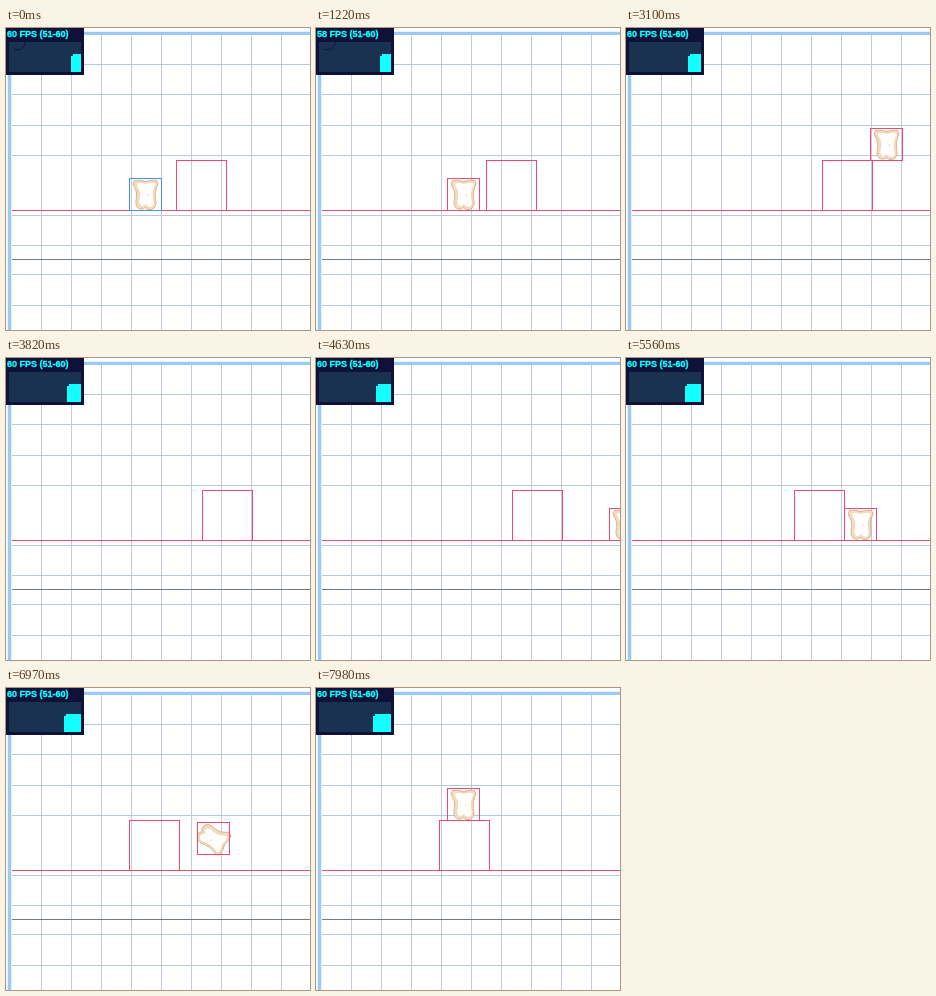
Recreate the animation shown at these times as an HTML page with a canvas. Size 304 by 302 pixels, loop 8000 ms.

```html
<!DOCTYPE html>
<html lang="en">
<head>
<meta charset="utf-8">
<title>Jumping toast</title>
<style>
  html, body { margin: 0; width: 100%; height: 100%; overflow: hidden; background: #fff; }
  canvas { display: block; width: 304px; height: 302px; }
</style>
</head>
<body>
<canvas id="stage" width="304" height="302"></canvas>
<script>
const ctx = document.getElementById('stage').getContext('2d');
const LOOP = 8;
const RED = '#f04871';

// Pixels and seconds
const FLOOR = 150, STEP = 50;
const WALK = 120, RETURN = 94, PUSH_RIGHT = 60, PUSH_LEFT = 65;
const JUMP = 371, GRAVITY = 1061;
const AIR_TIME = (JUMP + Math.sqrt(JUMP ** 2 - 2 * GRAVITY * STEP)) / GRAVITY;
const FIRST_JUMP = 2.22, FALL = 3.117, LAST_JUMP = 6.924;

const clamp = (v, max) => Math.min(max, Math.max(0, v));

// Distance covered so far by a steady move that begins at start
const travel = (t, start, distance, speed) =>
  Math.sign(distance) * clamp((t - start) * speed, Math.abs(distance));

// Height gained by a jump that lands on the box
const rise = age => {
  const a = clamp(age, AIR_TIME);
  return JUMP * a - GRAVITY / 2 * a * a;
};

const drop = age => Math.min(STEP, GRAVITY / 2 * Math.max(0, age) ** 2);

const pushed = t => travel(t, 1.28, 26, PUSH_RIGHT) + travel(t, 5.132, -73, PUSH_LEFT);

const boxX = t => 170 + pushed(t);

const toastX = t => 123 + pushed(t)
  + travel(t, 1.153, 15, WALK)
  + travel(t, 1.75, -24, WALK)
  + travel(t, 2.233, 180, WALK)
  + travel(t, 4.345, -74, RETURN)
  + travel(t, 6.4, 23, WALK)
  + travel(t, 6.928, -65, WALK);

const toastY = t => FLOOR - rise(t - FIRST_JUMP) + drop(t - FALL) - rise(t - LAST_JUMP);

const toastAngle = t => 2 * Math.PI *
  (clamp((t - FIRST_JUMP) / AIR_TIME, 1) + clamp((t - 6.74) / 0.69, 1));

function fill(color, x, y, w, h) {
  ctx.fillStyle = color;
  ctx.fillRect(x, y, w, h);
}

function outline(color, x, y, size) {
  ctx.strokeStyle = color;
  ctx.lineWidth = 1;
  ctx.strokeRect(Math.round(x) + 0.5, Math.round(y) + 0.5, size, size);
}

function drawGrid() {
  fill('#fff', 0, 0, 304, 302);
  for (let i = 1; i < 10; i++) fill('#c0cddd', Math.round(5.5 + i * 29.9), 6, 1, 296);
  for (const y of [36, 66, 97, 127, 187, 217, 246, 277]) fill('#b9c9dc', 6, y, 298, 1);
  fill('#767b82', 6, 231, 298, 1);
  fill('#e6f2fe', 1, 3, 303, 4);
  fill('#e6f2fe', 1, 3, 5, 299);
  fill('#9bcaf7', 2, 4, 302, 3);
  fill('#9bcaf7', 2, 4, 3, 298);
  fill(RED, 6, 182, 298, 1);
}

const slice = new Path2D('M-11-14Q-6-15 0-13Q6-15 11-14Q14-11 11-7Q9-2 10 4Q12 13 6 15Q2 16 0 13Q-3 16-7 14Q-11 11-9 3Q-8-3-11-7Q-14-11-11-14Z');
const crumb = new Path2D('M-8-12Q-4-13 0-11Q6-13 9-12Q12-10 9-7Q7-2 8 4Q10 12 5 13Q2 13 0 10Q-3 14-5 11Q-8 9-6 3Q-5-3-8-7Q-10-10-8-12Z');

function drawShape(path, color, edge, width) {
  ctx.fillStyle = color;
  ctx.strokeStyle = edge;
  ctx.lineWidth = width;
  ctx.fill(path);
  ctx.stroke(path);
}

function drawToast(x, y, angle) {
  ctx.save();
  ctx.translate(x + 16.5, y + 16.5);
  ctx.rotate(angle);
  drawShape(slice, '#f3dcc0', '#d0aa7e', 0.8);
  drawShape(crumb, '#fffefc', '#e9cca9', 0.6);
  fill('#c9b29a', 2, 0, 1, 1);
  ctx.restore();
}

function drawMeter(t) {
  const ticks = Math.floor(t + 0.5);
  fill('#101138', 0, 0, 78, 47);
  fill('#18324f', 3, 14, 72, 30);
  if (t < 2.6) {
    ctx.strokeStyle = '#0d1a34';
    ctx.lineWidth = 1;
    ctx.beginPath();
    ctx.moveTo(8, 21);
    ctx.bezierCurveTo(13, 23, 19, 21, 19, 14);
    ctx.stroke();
  }
  const left = 65 - ticks;
  for (let x = left; x < 75; x++) {
    const top = x < left + 2 ? 28 : 26;
    fill('#1ff', x, top, 1, 44 - top);
  }
  const label = `${ticks === 1 ? 58 : 60} FPS (51-60)`;
  ctx.font = 'bold 9px "Liberation Sans", Arial, sans-serif';
  ctx.fillStyle = ctx.strokeStyle = '#1ff';
  ctx.lineWidth = 0.35;
  ctx.fillText(label, 1, 9);
  ctx.strokeText(label, 1, 9);
}

function draw(t) {
  const x = toastX(t), y = toastY(t);
  drawGrid();
  outline(RED, boxX(t), 132, 50);
  drawToast(x, y, toastAngle(t));
  outline(t < 0.1 ? '#4c8fe8' : RED, x, y, 32);
  drawMeter(t);
}

const start = performance.now();
function frame() {
  draw((performance.now() - start) / 1000 % LOOP);
  requestAnimationFrame(frame);
}
frame();
</script>
</body>
</html>
```
